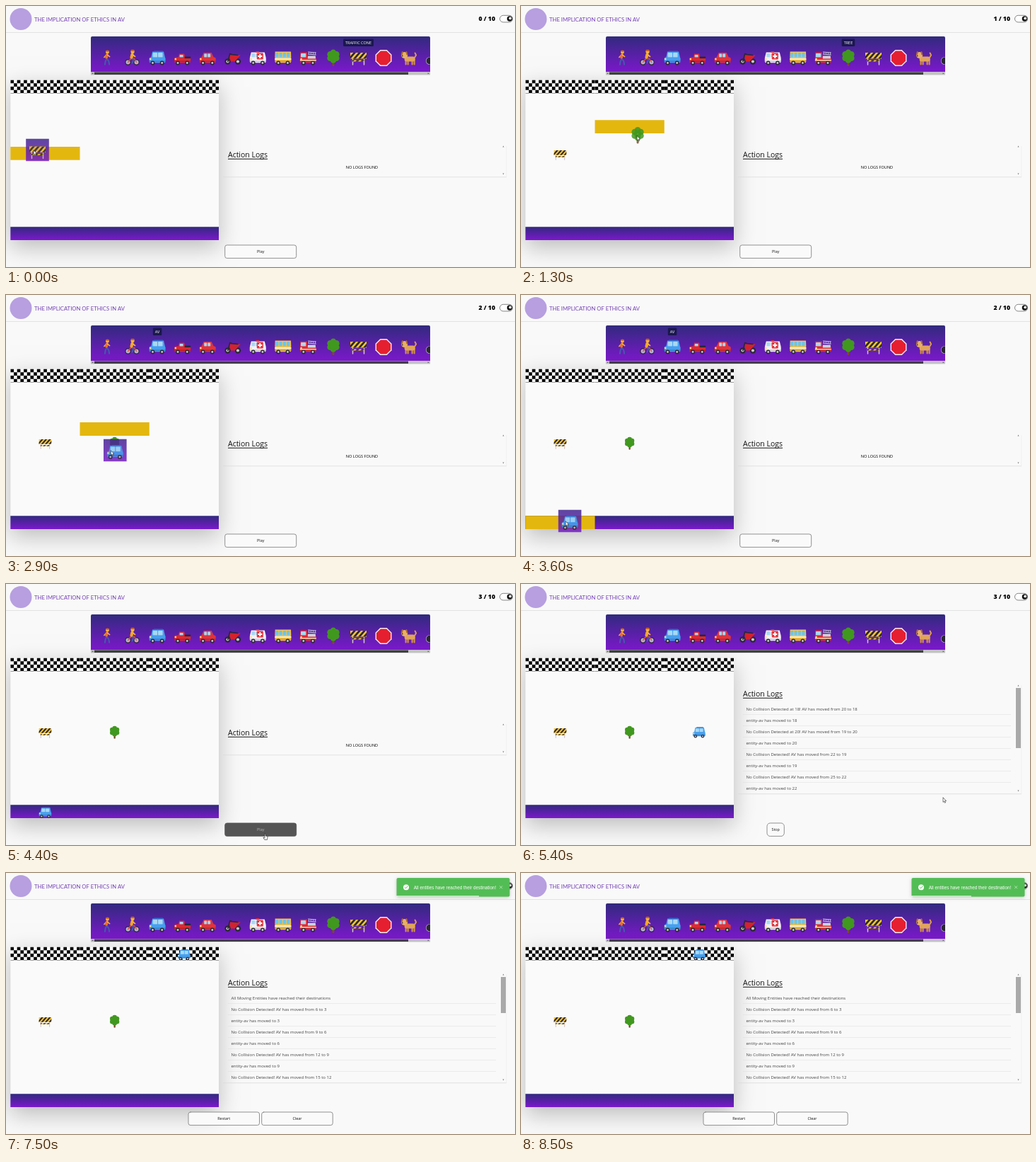
An HTML page with a canvas that plays this animation: 720x369 px, repeating every 8.6 s.

```html
<!DOCTYPE html>
<html lang="en">
<head>
<meta charset="utf-8">
<title>Ethics in AV</title>
<style>
html, body { margin: 0; width: 100%; height: 100%; overflow: hidden; background: #f9f9f9; }
canvas { display: block; width: 720px; height: 369px; }
</style>
</head>
<body>
<canvas id="stage"></canvas>
<script>
const LOOP = 8600, STEP = 100;
const canvas = document.getElementById('stage');
const ctx = canvas.getContext('2d');
const dpr = window.devicePixelRatio || 1;
canvas.width = 720 * dpr;
canvas.height = 369 * dpr;

const SANS = '"Open Sans", "Noto Sans", sans-serif';
const BOARD = { x: 6.3, y: 104.6, w: 294.7, h: 226.4 };
const CW = BOARD.w / 3, RH = BOARD.h / 12;

// ---------- drawing helpers ----------
function box(x, y, w, h, fill, r = 0, stroke, lw = 0.8) {
  ctx.beginPath();
  ctx.roundRect(x, y, w, h, r);
  if (fill) { ctx.fillStyle = fill; ctx.fill(); }
  if (stroke) { ctx.strokeStyle = stroke; ctx.lineWidth = lw; ctx.stroke(); }
}
function disc(x, y, r, fill) {
  ctx.beginPath();
  ctx.arc(x, y, r, 0, 7);
  ctx.fillStyle = fill;
  ctx.fill();
}
function trace(pts) {
  ctx.beginPath();
  for (let i = 0; i < pts.length; i += 2) ctx.lineTo(pts[i], pts[i + 1]);
}
function poly(fill, ...pts) {
  trace(pts);
  ctx.closePath();
  ctx.fillStyle = fill;
  ctx.fill();
}
function line(color, lw, ...pts) {
  trace(pts);
  ctx.strokeStyle = color;
  ctx.lineWidth = lw;
  ctx.lineCap = ctx.lineJoin = 'round';
  ctx.stroke();
}
function text(s, x, y, size, color, align = 'left', weight = 400, family = SANS) {
  ctx.font = `${weight} ${size}px ${family}`;
  ctx.textAlign = align;
  ctx.fillStyle = color;
  ctx.fillText(s, x, y);
  return ctx.measureText(s).width;
}
function arrow(x, y, dx, dy, color) {
  poly(color, x + dx, y + dy, x - dx - dy, y - dy - dx, x - dx + dy, y - dy + dx);
}
function violet(y, h) {
  const g = ctx.createLinearGradient(0, y, 0, y + h);
  g.addColorStop(0, '#312a7d');
  g.addColorStop(1, '#7b18cc');
  return g;
}
function shadow(color, blur, dy, draw) {
  ctx.save();
  ctx.shadowColor = color;
  ctx.shadowBlur = blur * dpr;
  ctx.shadowOffsetY = dy * dpr;
  draw();
  ctx.restore();
}
function clipped(x, y, w, h, draw) {
  ctx.save();
  ctx.beginPath();
  ctx.rect(x, y, w, h);
  ctx.clip();
  draw();
  ctx.restore();
}

// ---------- icons, about 24 units wide around 0,0 ----------
const SKIN = '#f5b445', INK = '#2b2733';

function wheel(x, y, r) {
  disc(x, y, r, INK);
  disc(x, y, r * .5, '#c9c6d2');
}
// A body on two wheels with a sloped cab of evenly spaced panes.
function vehicle(color, { left = -9, right = 9, top = -8, slope = 3, panes = 2, glass = '#a9d8f3' } = {}) {
  poly(color, left, 0, left + slope, top, right - slope, top, right, 0);
  const x = left + slope + .5, pane = (right - slope - .5 - x) / panes;
  for (let i = 0; i < panes; i++) box(x + i * pane, top + 1.6, pane - 1, -top - 2.4, glass, .8);
  box(-11.5, -1, 23, 7.8, color, 2);
  box(-11.5, 4, 23, 1.4, 'rgba(0,0,0,.22)');
  for (const side of [-1, 1]) wheel(side * 6.6, 7, 2.9);
  disc(-9.8, 1.6, 1.3, '#ffe27a');
}
function rider(shirt) {
  line(shirt, 4.2, 0, -5, -1, -1);
  line(SKIN, 1.6, 0, -5, 4, -2);
  disc(.5, -9, 2.6, SKIN);
  box(-2, -11.8, 5, 2.3, '#c8651f', 1);
}

const icons = {
  walker() {
    for (const side of [-1, 1]) line('#4658ae', 2.2, -.5, 1, side * 2.5, 5, side * 3.4, 10);
    line(SKIN, 1.6, -1, -5, -4.5, -1);
    rider('#ef6b2f');
  },
  cyclist() {
    for (const side of [-1, 1]) {
      disc(side * 6, 6, 4.2, INK);
      disc(side * 6, 6, 3, '#b9b2d8');
    }
    line('#e2503b', 1.4, -6, 6, -2, 1, 3, 1, 6, 6);
    line('#4658ae', 2, -1, 0, 2, 3, 0, 7);
    rider('#f5a623');
  },
  av() {
    vehicle('#46a0f0', { left: -9, right: 11, top: -9, slope: 2 });
    box(-5, -10, 13, 1.2, '#2b6fc4', .6);
  },
  pickup() {
    vehicle('#df2933', { left: -6, right: 4, top: -6, slope: 1.5, panes: 1 });
    box(3, -2, 8.5, 2.6, INK);
  },
  car() { vehicle('#e2343b', { top: -7.5, slope: 3.5 }); },
  motorbike() {
    for (const side of [-1, 1]) wheel(side * 7.2, 5, 4.2);
    poly('#d4222d', -5, -4, 11, -4, 3, 5, -3, 5);
    line(INK, 1.6, -7, 5, -4, -6, -1, -5, 7, -4);
  },
  ambulance() {
    vehicle('#f3f1f6', { left: -11.5, right: 11.5, slope: 2, panes: 3 });
    box(-1.5, -7, 9, 9, '#e8343b', 1);
    for (const [w, h] of [[2, 6], [6, 2]]) box(3 - w / 2, -2.5 - h / 2, w, h, '#fff');
    box(-3, -9.6, 5, 2, '#e8343b', 1);
  },
  bus() {
    vehicle('#f7c443', { left: -11.5, right: 11.5, top: -9, slope: .3, panes: 4, glass: '#6cc3ec' });
    box(-11.5, .6, 23, 1.8, '#f6f2df');
  },
  fireEngine() {
    vehicle('#e12d36', { left: -11.5, right: -1, slope: .6, panes: 1 });
    box(-.5, -3, 11, 4, '#cfd2dd', .6);
    box(-11.5, 2.6, 23, 1.4, '#fbe9b6');
    for (const y of [-8.5, -5.5]) line('#c5c7d6', 1, 0, y, 11, y + 1);
    for (let x = 1; x < 11; x += 3) line('#c5c7d6', .8, x, -8, x, -5);
  },
  tree() {
    line('#7d4a2b', 3, 0, 3, 0, 10);
    for (let i = 0; i < 6; i++) {
      const a = i * Math.PI / 3 - Math.PI / 2;
      disc(5 * Math.cos(a), 5.4 * Math.sin(a) - 2.4, 4.3, '#41981f');
    }
    disc(0, -2, 5, '#41981f');
  },
  barrier() {
    for (const side of [-1, 1]) line('#d8c6cc', 1.5, side * 8, -7, side * 8, 9.6);
    for (const [w, y, h] of [[23, -7.6, 8.6], [17, 3, 2]])
      clipped(-w / 2, y, w, h, () => {
        box(-12, -9, 24, 16, '#f7c531');
        for (let x = -18; x < 20; x += 7) line(INK, 2.7, x, 7, x + 14, -9);
      });
  },
  stop() {
    for (const [r, color] of [[12.4, '#f2eef4'], [10.9, '#e51f30']])
      poly(color, ...Array.from({ length: 16 }, (_, i) => {
        const a = ((i >> 1) + .5) * Math.PI / 4;
        return r * (i % 2 ? Math.sin(a) : Math.cos(a));
      }));
  },
  dog() {
    line('#d99a50', 2, 8, 0, 10.5, -4, 9, -7);
    for (const x of [-4, -1, 5, 8]) line('#d19249', 2.2, x, 2, x, 9);
    box(-6, -2, 15, 7, '#e0a45b', 3);
    disc(-6, -4, 4.6, '#e8b06a');
    for (const side of [-1, 1]) line('#a9692f', 2, -6 + side * 2.8, -8.4, -6 + side * 3.6, -5);
    disc(-9, -3, .9, INK);
  }
};
const names = Object.keys(icons);
const slot = name => ({ x: 143 + names.indexOf(name) * 35.55, y: 73.5 });

function icon(name, x, y, scale = 1) {
  ctx.save();
  ctx.translate(x, y);
  ctx.scale(scale, scale);
  icons[name]();
  ctx.restore();
}

// ---------- timeline ----------
const PLAY = 4500, HOP = 125, DONE = 6100, TOAST = 6150, LEAVE = 7200;
const drags = [
  { name: 'barrier', tip: 'TRAFFIC CONE', hover: 0, grab: 0, drop: 200, cell: 16, dx: 5.5, boxed: true },
  { name: 'tree', tip: 'TREE', hover: 800, grab: 900, drop: 1600, cell: 17, dx: 1, bend: 4 },
  { name: 'av', tip: 'AV', hover: 2200, grab: 2450, drop: 3700, cell: 34, dx: 6, boxed: true }
];
function cellMid(n) {
  return { x: BOARD.x + ((n - 1) % 3 + .5) * CW, y: BOARD.y + (Math.floor((n - 1) / 3) + .5) * RH };
}
// Cursor moves: to the icon, then to its cell, then the button, the log and away.
const legs = drags.flatMap(d => [
  { from: d.hover - 500, to: d.hover, end: d.grab ? slot(d.name) : { x: 39, y: 204 } },
  { from: d.grab, to: d.drop, end: cellMid(d.cell), bend: d.bend }
]).concat(
  { from: 3800, to: 4300, end: { x: 366, y: 353 } },
  { from: PLAY, to: 5300, end: { x: 597, y: 302 } },
  { from: 6400, to: 6700, end: { x: 589, y: 292 } },
  { from: 6700, to: LEAVE, end: { x: 728, y: 190 } }
);
const easeOut = (p, power) => 1 - Math.pow(1 - p, power);

function cursorAt(t) {
  let { x, y } = legs[0].end;
  for (const { from, to, end, bend = 1.2 } of legs) {
    if (t <= from) break;
    const p = Math.min(1, (t - from) / (to - from));
    x += (end.x - x) * easeOut(p, bend);
    y += (end.y - y) * easeOut(p, 2);
  }
  return { x, y };
}

// Drive straight up, else diagonally, else sideways.
const free = n => !drags.some(d => d.cell === n);
const route = [34];
for (let n = 34; n > 3; route.push(n)) n = free(n - 3) ? n - 3 : free(n - 2) ? n - 2 : n + 1;
const hopsAt = t => Math.max(0, Math.min(route.length - 1, Math.floor((t - PLAY) / HOP)));

function logsAt(t) {
  const logs = [];
  for (let i = 1; i <= hopsAt(t); i++) {
    const from = route[i - 1], to = route[i];
    const where = from - to === 3 ? '' : ' at ' + to;
    logs.unshift(`No Collision Detected${where}! AV has moved from ${from} to ${to}`, `entity-av has moved to ${to}`);
  }
  if (t >= DONE) logs.unshift('All Moving Entities have reached their destinations');
  return logs;
}

// ---------- page parts ----------
function header(count) {
  disc(21, 18.5, 15.5, '#b79fe0');
  text('THE IMPLICATION OF ETHICS IN AV', 40, 21.5, 7.7, '#7440b4', 'left', 400, 'Lato, sans-serif');
  text(`${count} / 10`, 692, 21.4, 8.7, '#000', 'right', 800);
  box(698.5, 13.3, 18.2, 9.6, '#fff', 4.8, '#666');
  disc(712.4, 18, 3.7, '#111');
  disc(713.2, 17.4, 1.9, '#f5f5f5');
  box(0, 37, 720, .8, '#dcdcdc');
}

function palette(t) {
  box(120, 43, 480, 50, violet(43, 50), [2, 2, 0, 0]);
  for (const name of names) icon(name, slot(name).x, slot(name).y, name === 'walker' ? .92 : 1);
  clipped(120, 43, 480, 50, () => {
    disc(599.5, 77.5, 5.6, '#b9b4cc');
    disc(599.5, 77.5, 4.9, INK);
  });
  box(120, 93, 480, 4.6, '#c3c3c6');
  box(125, 93.6, 444, 3.5, '#403f45');
  arrow(122.4, 95.3, -.9, 0, '#444');
  arrow(597.6, 95.3, .9, 0, '#444');
  const d = drags.find(d => t >= d.hover && t < d.drop);
  if (!d) return;
  const x = slot(d.name).x;
  ctx.font = `400 5.5px ${SANS}`;
  const w = ctx.measureText(d.tip).width + 6;
  box(x - w / 2, 46.5, w, 10.6, '#1b174f', 1.4);
  text(d.tip, x, 53.9, 5.5, '#fff', 'center');
}

function checkers() {
  const s = 4.69;
  for (let col = 0; col < 3; col++)
    clipped(BOARD.x + col * CW, BOARD.y, CW, RH, () => {
      for (let r = 0; r * s < RH; r++)
        for (let c = r % 2; c * s < CW; c += 2) box(BOARD.x + col * CW + c * s, BOARD.y + r * s, s, s, '#000');
    });
}

function board(t) {
  const { x, y, w, h } = BOARD;
  shadow('rgba(0,0,0,.25)', 30, 10, () => box(x, y, w, h, '#fafafa'));
  checkers();
  box(x, y + 11 * RH, w, RH, violet(y + 11 * RH, RH));

  const drag = drags.find(d => t >= d.grab && t < d.drop);
  if (drag) {
    const p = cursorAt(t - STEP);
    const c = Math.floor((p.x - x) / CW), r = Math.floor((p.y - y) / RH);
    if (c >= 0 && c < 3 && r >= 0 && r < 12) box(x + c * CW, y + r * RH, CW, RH, '#e4b70f');
  }
  for (const d of drags) {
    if (t < d.drop) continue;
    const p = cellMid(d.name === 'av' ? route[hopsAt(t)] : d.cell);
    icon(d.name, p.x, p.y + 1.6, .77);
  }
  if (drag) {
    const p = cursorAt(t), cx = p.x + drag.dx, cy = p.y - .5;
    ctx.globalAlpha = .85;
    if (drag.boxed) box(cx - 16.3, cy - 15.8, 32.6, 31.5, violet(cy - 26, 46));
    icon(drag.name, cx, cy + (drag.boxed ? 2.5 : 0));
    ctx.globalAlpha = 1;
  }
}

function logPanel(t, mouse) {
  const logs = logsAt(t), n = logs.length;
  const h = Math.min(158, 32 + 16 * Math.max(1, n)), top = 218 - h / 2, bottom = top + h;
  box(307, bottom - .6, 401, .8, '#d9d9d9');
  box(707.6, top + 4, .6, h - 4, '#ececec');
  clipped(307, top, 401, h - .6, () => {
    const w = text('Action Logs', 314, top + 20.4, 10.5, '#111', 'left', 500);
    box(314, top + 21.8, w, .9, '#111');
    if (!n) text('NO LOGS FOUND', 503.5, top + 36.2, 5.6, '#000', 'center', 500);
    logs.forEach((s, i) => {
      const y = top + 30.2 + i * 16;
      const over = mouse.x > 314 && mouse.x < 693 && mouse.y >= y && mouse.y < Math.min(y + 16, bottom);
      if (over) box(314, y, 379, 16, violet(y, 16), 1.5);
      else box(314, y + 15.2, 379, .7, '#dedede');
      text(s, 318.5, y + 10, 6, over ? '#fff' : '#444');
    });
  });
  arrow(703.5, top + 4.5, 0, -1, '#777');
  arrow(703.5, bottom - 4.5, 0, 1, '#777');
  const content = 40 + 16 * n;
  if (content > 168) box(700, top + 8, 7, 142 * h / content, t >= 6500 && t < LEAVE ? '#686868' : '#a9a9a9');
}

function button(label, x, w, dark) {
  box(x, 338, w, 18.6, dark ? '#555' : '#fafafa', w < 40 ? 4.5 : 3, dark ? '#555' : '#777');
  text(label, x + w / 2, 349.3, 5.4, dark ? '#b5b5b5' : '#111', 'center', dark ? 400 : 500);
}
function controls(t, mouse) {
  if (t >= DONE) {
    button('Restart', 258, 100.5);
    button('Clear', 361.7, 100.5);
  } else if (t >= PLAY) button('Stop', 348, 24.3);
  else button('Play', 309.7, 101, mouse.x > 310 && mouse.x < 411 && mouse.y > 338 && mouse.y < 357);
}

function toast(t) {
  if (t < TOAST) return;
  const p = (t - TOAST) / 700;
  const x = 552.5 + 1125 * Math.exp(-9 * p) * Math.cos(6 * p);
  shadow('rgba(0,0,0,.2)', 5, 1, () => box(x, 7, 160, 26.6, '#53bd55', 2));
  disc(x + 13.5, 20.2, 4, '#fff');
  line('#53bd55', 1, x + 11.6, 20.3, x + 13, 21.7, x + 15.6, 18.8);
  text('All entities have reached their destination!', x + 24.2, 22.5, 6.3, '#fff', 'left', 400, '"Liberation Sans", Arial, sans-serif');
  for (const s of [-1.7, 1.7]) line('rgba(255,255,255,.7)', .7, x + 146, 20.1 - s, x + 149.4, 20.1 + s);
  box(x, 31.9, 160 - (t - TOAST) * .0322, 1.7, 'rgba(255,255,255,.75)');
}

function pointer(t, { x, y }) {
  if (t >= LEAVE) return;
  const hand = t >= 4300 && t <= PLAY || t >= 6500;
  ctx.save();
  ctx.translate(x, y);
  const pts = hand
    ? [0, 0, 1.1, 0, 1.1, 3, 4.2, 4, 3.4, 8.6, -.2, 8.6, -2.2, 5.4, 0, 6]
    : [0, 0, 0, 6.4, 1.5, 5.1, 2.5, 7.4, 3.6, 6.9, 2.6, 4.7, 4.6, 4.6];
  poly('#fff', ...pts);
  line('#222', .6, ...pts, 0, 0);
  ctx.restore();
}

function frame() {
  const t = Math.floor(performance.now() % LOOP / STEP) * STEP;
  const mouse = cursorAt(t);
  ctx.setTransform(dpr, 0, 0, dpr, 0, 0);
  box(0, 0, 720, 369, '#f9f9f9');
  header(drags.filter(d => t >= d.drop).length);
  palette(t);
  board(t);
  logPanel(t, mouse);
  controls(t, mouse);
  toast(t);
  pointer(t, mouse);
  requestAnimationFrame(frame);
}
frame();
</script>
</body>
</html>
```
